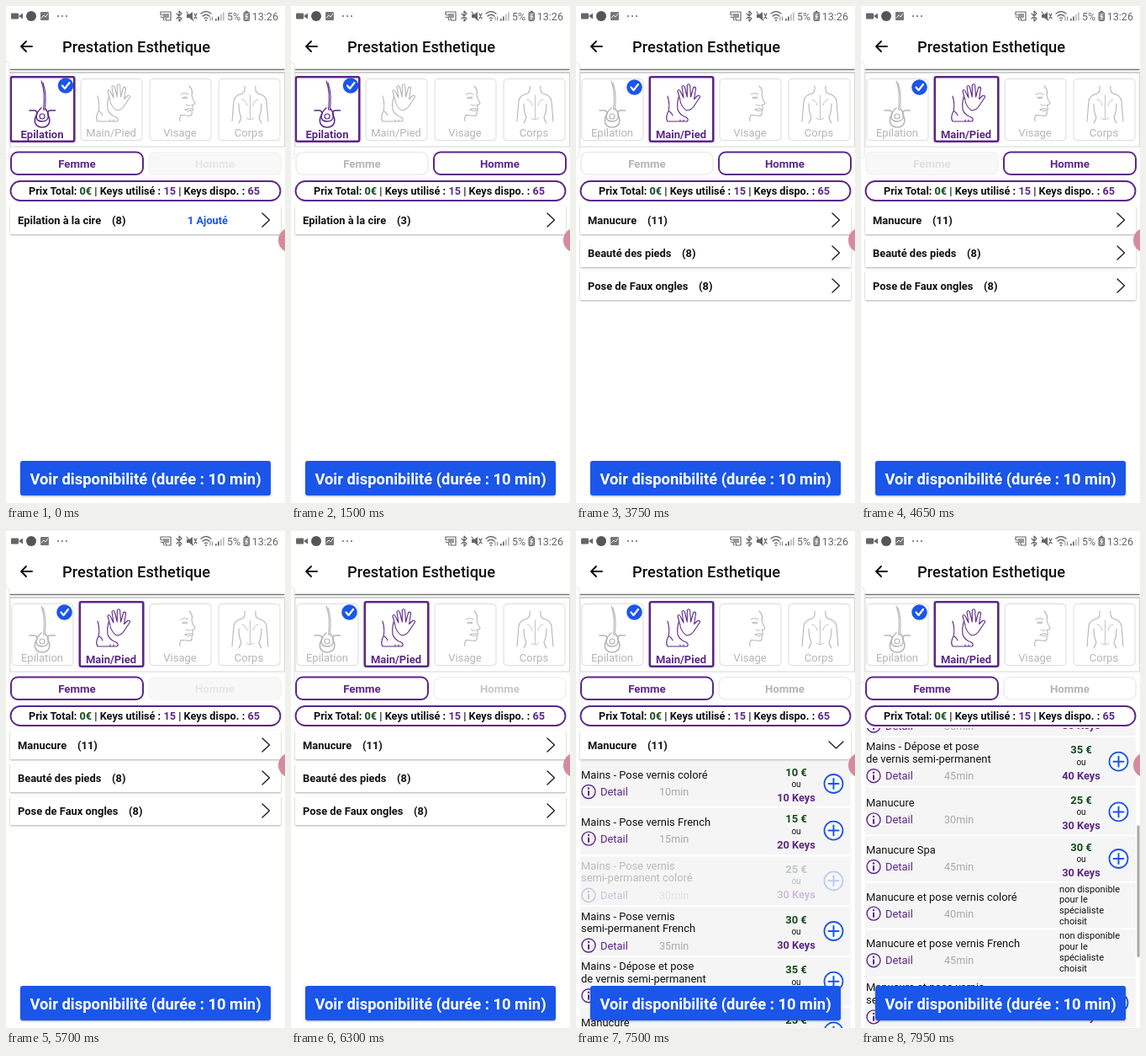
An HTML page that plays this animation: 332x590 px, repeating every 8000 ms.

```html
<!DOCTYPE html>
<html lang="fr">
<head>
<meta charset="utf-8">
<title>Prestation Esthetique</title>
<style>
html, body { margin: 0; width: 100%; height: 100%; overflow: hidden; background: #fff; }
svg { display: block; width: 100vw; height: 100vh; font-family: Roboto, sans-serif; }
.card { filter: drop-shadow(0 1px 1px rgba(0, 0, 0, .32)); }
.line { fill: none; stroke-linecap: round; stroke-linejoin: round; }
</style>
</head>
<body>
<svg id="stage" viewBox="0 0 332 590"></svg>
<script>
const LOOP = 8000;
const PURPLE = '#5c2788', BLUE = '#1a56ea', GREY = '#b5b5b8', INK = '#111', GREEN = '#154a1b';
const stage = document.getElementById('stage');

// Interface states: each entry changes the state from its time on.
const STEPS = [
  [0, { tab: 0, sex: 0, list: 0, homme: .25, femme: 1, main: 1, listAlpha: 1, head: 1, open: 0, scroll: 0, item: 1 }],
  [1350, { sex: 1, list: 1, homme: .6 }],
  [1500, { homme: 1 }],
  [3000, { main: .45 }],
  [3450, { tab: 1, main: .8 }],
  [3600, { main: 1, list: 2, listAlpha: .6 }],
  [3750, { listAlpha: 1 }],
  [4650, { femme: .35 }],
  [4950, { sex: 0, femme: 1 }],
  [5700, { homme: .25 }],
  [6150, { homme: .5 }],
  [6300, { homme: .75 }],
  [6450, { homme: 1 }],
  [6750, { head: .6 }],
  [6900, { head: .22 }],
  [7050, { head: .7, open: .45 }],
  [7200, { head: 1, open: .85 }],
  [7350, { open: 1 }],
  [7500, { item: .25 }],
  [7650, { item: .7, scroll: 45 }],
  [7800, { item: 1, scroll: 155 }],
  [7950, { scroll: 261 }]
];

const LISTS = [
  [['Epilation à la cire', 8, 126, '1 Ajouté']],
  [['Epilation à la cire', 3, 126]],
  [['Manucure', 11, 85], ['Beauté des pieds', 8, 126], ['Pose de Faux ongles', 8, 146]]
];

// Title lines, minutes, euros, keys (no price means unavailable).
const ITEMS = [
  ['Mains - Pose vernis coloré', 10, 10, 10],
  ['Mains - Pose vernis French', 15, 15, 20],
  ['Mains - Pose vernis|semi-permanent coloré', 30, 25, 30],
  ['Mains - Pose vernis|semi-permanent French', 35, 30, 30],
  ['Mains - Dépose et pose|de vernis semi-permanent', 45, 35, 40],
  ['Manucure', 30, 25, 30],
  ['Manucure Spa', 45, 30, 30],
  ['Manucure et pose vernis coloré', 40],
  ['Manucure et pose vernis French', 45],
  ['Manucure et pose vernis|semi-permanent coloré', 50, 35, 40],
  ['Manucure et pose vernis|semi-permanent French', 55, 40, 40]
];
const LIST_TOP = 235, ROWS_TOP = 272, HEAD_STEP = 39, CONTENT = 808;

const isDouble = item => item[0].includes('|');
let mid = 300;
const centers = ITEMS.map((item, i) => {
  if (i) mid += isDouble(item) || isDouble(ITEMS[i - 1]) ? 59.7 : 55.6;
  return mid;
});
const edges = [ROWS_TOP, ...centers.slice(1).map((c, i) => (c + centers[i]) / 2), mid + 30];
const ROWS_HEIGHT = edges[ITEMS.length] - ROWS_TOP;

const text = (x, y, size, fill, value, weight = 400, anchor = 'start') =>
  `<text x="${x}" y="${y}" font-size="${size}" fill="${fill}" font-weight="${weight}" text-anchor="${anchor}">${value}</text>`;
const rect = (x, y, w, h, r, fill, stroke = 'none', sw = 1, extra = '') =>
  `<rect x="${x}" y="${y}" width="${w}" height="${h}" rx="${r}" fill="${fill}" stroke="${stroke}" stroke-width="${sw}" ${extra}/>`;
const circle = (x, y, r, fill, stroke = 'none', sw = 1) =>
  `<circle cx="${x}" cy="${y}" r="${r}" fill="${fill}" stroke="${stroke}" stroke-width="${sw}"/>`;
const line = (d, color, w = 1) =>
  `<path class="line" d="${d}" stroke="${color}" stroke-width="${w}"/>`;
const group = (alpha, body) => `<g opacity="${alpha}">${body}</g>`;

function statusBar() {
  const c = '#666';
  return rect(6, 8.5, 9, 7, 1, c) + `<path d="M15 12l5-3.500v7z" fill="${c}"/>`
    + circle(30, 12, 6, '#555')
    + rect(41, 7, 10, 10, 1, '#777') + line('M42 14l3-3 2 2 3-4', '#eee')
    + [62, 67, 72].map(x => circle(x, 12, 1, c)).join('')
    + line('M184 10V7h12v10h-5M184 13q4 0 4 4M184 10.500q6.500 0 6.500 6.500', c, 1.2) + rect(187, 9, 7, 5, 0, '#999')
    + line('M203 9l6 6-3 3V6l3 3-6 6', c, 1.2)
    + `<path d="M215 10h3l4-3v10l-4-3h-3z" fill="${c}"/>` + line('M215 7l8 10M224 9l3 6M227 9l-3 6', c, 1.2)
    + line('M232 9q6-5 12 0M234 12q4-3.500 8 0M236.500 14.500q1.500-1.200 3 0', c, 1.3) + circle(238, 17, 1, c)
    + line('M243 13v4M245.500 17v-4', '#888')
    + [0, 1, 2, 3].map(i => rect(249 + i * 3, 15 - i * 2.5, 1.7, 2.5 + i * 2.5, 0, i < 2 ? c : '#bbb')).join('')
    + text(263, 17, 12.4, c, '5%')
    + rect(283, 7.5, 6.5, 10, 1, '#999', c) + rect(285, 5.7, 2.5, 2, 0, c) + line('M287 9.500l-2 3h2.500l-2 3', '#fff')
    + text(324, 17, 12.6, c, '13:26', 400, 'end');
}

const ICONS = [
  c => line('M42 89Q47 103 44.500 123M44 91Q49 106 46 124', c, 1.1)
    + line('M42 121C34 128 34 137 43 137S52 128 47 122', c, 1.5)
    + line('M28 124h6q4 1 2.500 5C31 139 37 144 43 144S55 139 50 129q-1.500-4 2.500-5h6', c, 1.6)
    + circle(43, 131, 3, 'none', c, 1.2),
  c => line('M124 112l-3-11q1-3 3 0l4 8-2-13q1.500-3 3.300 0l3 12V94q2-2.500 3.300 0l1 14 3-11q2-2 3 .5l-2 13 4-4q3-1 3 1.500l-6 9q-4 7-10 7-6-4-7.600-11', c, 1.1)
    + line('M109 107q3 10 1 18-4 7-1 12h23q3-2-1-5-7-2-10-9-1-7 1-15M111 125q3 2 4 5M124 137v-2M128 137v-2', c, 1.1),
  c => line('M218 95q5 5 3 11 1 5 4 9 0 2-4 2.500 2 2 1 4 1 2-1 3 1 5-2 6-7-1-11-1-2 3-1 7', c, 1.1)
    + line('M208 105q5-3 9 0M210 109q4-2 6 0-3 2-6 0M214 117q2 2 5 1M213 123q4-2 8-1M213 123q4 3 7 1', c, 1),
  c => line('M284 95q1 7-3 9-9 2-10 9l-2 24M297 95q-1 7 3 9 9 2 10 9l2 24M277 116q0 10 3 16-1 4-3 7M304 116q0 10-3 16 1 4 3 7', c, 1.1)
    + line('M290.500 106v28M281 111q5 1 6 7M300 111q-5 1-6 7M286 133q4 4 9 0', c, .8)
];
const TABS = ['Epilation', 'Main/Pied', 'Visage', 'Corps'];

function tabs(s) {
  let out = line('M5 75.500H331', '#777', 1.3) + rect(5, 79, 326.5, 88, 0, '#fff', '#d6d6d6')
    + line('M5 79H331', '#c6c6c6', 1.4);
  TABS.forEach((name, i) => {
    const on = i === s.tab, x = 7 + i * 82, c = on ? PURPLE : GREY;
    const box = on ? rect(x - 1.2, 84.3, 75.5, 76.5, 2, '#fff', PURPLE, 2.6)
      : rect(x, 86.5, 73, 73, 4, '#fff', '#dcdcdc', 1);
    out += group(i === 1 ? s.main : 1, box + ICONS[i](c)
      + text(x + 36, on ? 156.5 : 155.3, 13, c, name, on ? 700 : 400, 'middle'));
  });
  const [cx, cy] = s.tab ? [69.5, 96.5] : [71, 94.5];
  return out + circle(cx, cy, 9.3, BLUE) + line(`M${cx - 4} ${cy}l3 3.500 5.500-7`, '#fff', 2.2);
}

function toggle(s) {
  return ['Femme', 'Homme'].map((name, i) => {
    const on = s.sex === i, alpha = i ? s.homme : s.femme, x = 6 + i * 164;
    const pressed = alpha < .5 ? rect(x - 1, 173, 159, 28, 7, '#f8f8f8') : '';
    return pressed + group(alpha, rect(x, 173.5, 157, 26.5, 8, pressed ? 'none' : '#fff', on ? PURPLE : '#e6e6e6', on ? 2 : 1.2)
      + text(x + 78.5, 191.5, 13.3, on ? PURPLE : GREY, name, 700, 'middle'));
  }).join('');
}

function total() {
  const n = v => `<tspan fill="${PURPLE}">${v}</tspan>`;
  const zero = `<tspan fill="${GREEN}">0€</tspan>`;
  return rect(5.5, 208, 321, 23, 11.5, '#fff', PURPLE, 1.9)
    + text(27, 224, 12.73, INK, `Prix Total: ${zero} | Keys utilisé : ${n(15)} | Keys dispo. : ${n(65)}`, 700);
}

function header([name, count, x, added], y, open, alpha) {
  const arrow = open ? `M301 ${y - 4}l8.500 8 8.500-8` : `M305 ${y - 8}l8.500 8-8.500 8`;
  return rect(5, y - 17, 322, 34, 1, alpha < .5 ? '#f4f4f4' : '#fff', 'none', 0, alpha < .5 ? '' : 'class="card"')
    + group(alpha, text(14, y + 4.5, 12.9, INK, name, 700) + text(x, y + 4.5, 12.9, INK, `(${count})`, 700)
      + (added ? text(216, y + 4.5, 12.75, BLUE, added, 700) : '') + line(arrow, '#222', 1.4));
}

function row(item, i, alpha) {
  const [title, min, euros, keys] = item, c = centers[i], dbl = isDouble(item);
  const detail = c + (dbl ? 17 : 9.5);
  let out = title.split('|').map((t, k) => text(6, c + (dbl ? -13.5 + k * 14.5 : -6), 12.93, INK, t)).join('');
  out += circle(15, detail, 8, 'none', PURPLE, 1.4) + line(`M15 ${detail - .5}v4.500`, PURPLE, 2) + circle(15, detail - 4, 1.2, PURPLE)
    + text(29, detail + 4.5, 12.95, PURPLE, 'Detail') + text(99, detail + 4.5, 12.6, '#a9a9ac', min + 'min');
  if (euros) {
    out += text(262, c - 9.5, 13, GREEN, euros + ' €', 700, 'middle') + text(262, c + 4, 10, INK, 'ou', 400, 'middle')
      + text(262, c + 21, 12.8, PURPLE, keys + ' Keys', 700, 'middle')
      + circle(306.5, c, 11, '#fff', BLUE, 1.8) + line(`M300.500 ${c}h12M306.500 ${c - 6}v12`, BLUE, 2);
  } else {
    out += ['non disponible', 'pour le', 'spécialiste', 'choisit']
      .map((t, k) => text(236, c - 16 + k * 12.8, 11.1, INK, t)).join('');
  }
  return rect(5, edges[i] + 1, 322, edges[i + 1] - edges[i] - 2, 0, '#f5f5f5') + group(alpha, out);
}

function list(s) {
  const grown = s.open * ROWS_HEIGHT;
  let out = '';
  if (s.open) {
    out += `<clipPath id="fold"><rect x="0" y="${ROWS_TOP}" width="332" height="${grown}"/></clipPath>`
      + `<g clip-path="url(#fold)">${ITEMS.map((item, i) => row(item, i, i === 2 ? s.item : 1)).join('')}</g>`;
  }
  LISTS[s.list].forEach((head, i) => {
    out += header(head, 254 + i * HEAD_STEP + (i ? grown : 0), s.open && !i, i ? 1 : s.head);
  });
  const view = 590 - LIST_TOP, k = view / CONTENT;
  const bar = s.scroll ? rect(328.5, LIST_TOP + s.scroll * k, 3, view * k, 0, '#a8a8a8') : '';
  return `<clipPath id="view"><rect x="0" y="${LIST_TOP - 1}" width="332" height="${view + 1}"/></clipPath>`
    + `<g clip-path="url(#view)" opacity="${s.listAlpha}"><g transform="translate(0 ${-s.scroll})">${out}</g>${bar}</g>`;
}

function picture(s) {
  return rect(0, 0, 332, 590, 0, '#fff') + statusBar()
    + line('M31 48H18.500M24 42l-6 6 6 6', INK, 1.9)
    + text(67, 55, 18.3, INK, 'Prestation Esthetique', 500)
    + tabs(s) + toggle(s) + list(s) + total()
    + line('M0 66q4 1 4 6V176q0 4-4 5', '#e2e2e2', 1)
    + circle(339, 278, 15, '#d58b9d')
    + rect(17, 540, 298, 41, 3, BLUE, 'none', 0, 'class="card"')
    + text(166, 567.5, 18.37, '#fff', 'Voir disponibilité (durée : 10 min)', 700, 'middle');
}

let shown = -1;
function render(t) {
  const passed = STEPS.filter(step => step[0] <= t);
  if (passed.length === shown) return;
  shown = passed.length;
  stage.innerHTML = picture(Object.assign({}, ...passed.map(step => step[1])));
}

const start = performance.now();
function tick() {
  render((performance.now() - start) % LOOP);
  requestAnimationFrame(tick);
}
tick();
</script>
</body>
</html>
```
